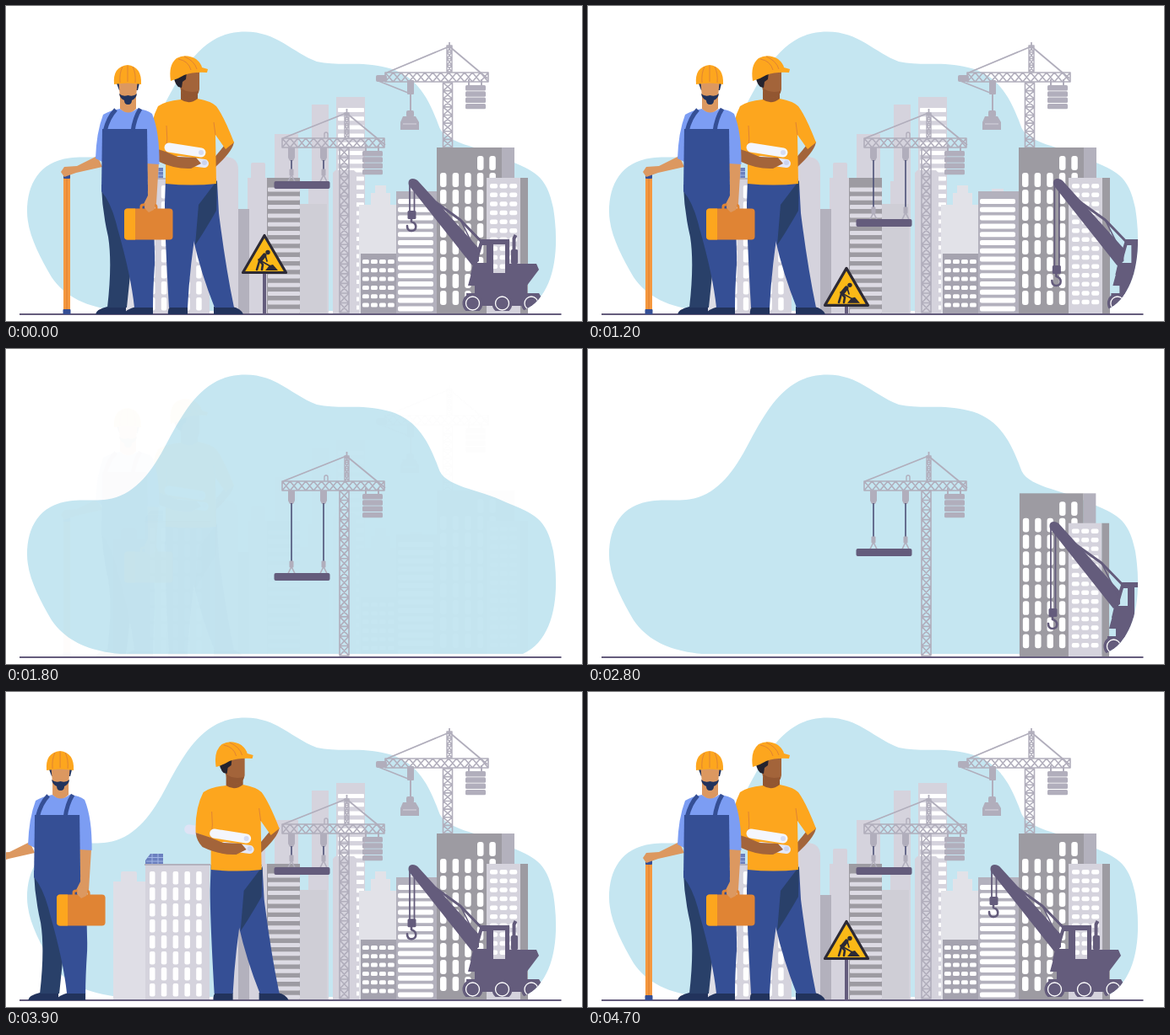
Write an HTML page that moves like this. It is 682 by 374 pixels and loops after 4.8 s.

```html
<!DOCTYPE html>
<html lang="en">
<head>
<meta charset="utf-8">
<title>Construction site</title>
<style>
html, body { margin: 0; width: 100%; height: 100%; overflow: hidden; background: #fff; }
svg { display: block; width: 682px; height: 374px; }
</style>
</head>
<body>
<svg id="stage" viewBox="0 0 682 374" xmlns="http://www.w3.org/2000/svg"></svg>
<script>
const LOOP = 4800, STEP = 100, GROUND = 365;
const C = {
  sky: '#c5e6f1', dark: '#645c7c', steel: '#b1aebc', white: '#fff',
  gray: '#9d9ba2', mid: '#b3b1bd', light: '#d5d3dd', pale: '#dfdee6',
  orange: '#fda61e', deep: '#e08434', blue: '#354f95', navy: '#294069',
  shirt: '#7c9df3', skin: '#dc9860', brown: '#a3643a', ink: '#22335c', black: '#2c2a35'
};

// drawing helpers
const rect = (x, y, w, h, fill, r = 0) =>
  `<rect x="${x}" y="${y}" width="${w}" height="${h}" rx="${r}" fill="${fill}"/>`;
const path = (d, fill) => `<path d="${d}" fill="${fill}"/>`;
const line = (d, color, w = 2, cap = 'butt') =>
  `<path d="${d}" fill="none" stroke="${color}" stroke-width="${w}" stroke-linecap="${cap}" stroke-linejoin="round"/>`;
const dot = (x, y, r, fill) => `<circle cx="${x}" cy="${y}" r="${r}" fill="${fill}"/>`;
const group = (id, body, extra = '') => `<g id="${id}" ${extra}>${body}</g>`;
const tower = (x, top, w, fill) => rect(x, top, w, GROUND - top, fill);

function windows(x, y, cols, rows, dx, dy, w, h, r = 1.5, fill = C.white) {
  let s = '';
  for (let j = 0; j < rows; j++)
    for (let i = 0; i < cols; i++) s += rect(x + i * dx, y + j * dy, w, h, fill, r);
  return s;
}

// girder with crossed bracing; cells run along its longer side
function lattice(x, y, w, h, n, rail = 1.6) {
  let d = `M${x} ${y}h${w}v${h}h${-w}z`;
  for (let i = 0; i < n; i++) {
    d += w > h
      ? `M${x + w * i / n} ${y}l${w / n} ${h}m${-w / n} 0l${w / n} ${-h}`
      : `M${x} ${y + h * i / n}l${w} ${h / n}m0 ${-h / n}l${-w} ${h / n}h${w}`;
  }
  return line(d, C.steel, rail);
}

const weights = (x, y, n) => {
  let s = line(`M${x + 4} ${y - 7}v9M${x + 19} ${y - 7}v9`, C.steel, 2);
  for (let i = 0; i < n; i++) s += rect(x, y + i * 7.3, 24, 6.4, C.steel, 1.5);
  return s;
};

const blob = 'M120 178.500C150 174 170 150 187 118C205 85 225 42 265 32.500C315 22.500 335 54 368 66' +
  'C395 72 420 65 450 73C485 81 500 108 512 141C518 164 560 166 592 182C625 196 640 200 648 240' +
  'C656 290 650 345 612 362H135C95 358 70 345 54 322C40 298 25 270 25 244C25 211 40 185 75 180.500C90 178 105 181 120 178.500Z';

const backTowers =
  tower(391, 108, 34, C.light) + windows(393, 121, 1, 24, 0, 10.2, 31, 5, 1) +
  tower(362, 117, 20, C.light) + tower(318, 152, 28, C.light) +
  tower(286, 204, 25, C.light) + rect(290, 186, 17, 20, C.light, 2) +
  tower(275, 241, 13, C.mid) +
  path('M247 365V190Q248 179 260 179Q275 180 275 194V365Z', C.light) +
  path('M165 205V200L171 192H186V205Z', '#6b80bf') +
  line('M168 196.500H186M166 201H186M173 192V205M180 192V205', '#a3b6e6', 1) +
  tower(165, 205, 76, C.light) + rect(164, 204, 78, 2, C.mid) +
  windows(170, 213, 5, 8, 13.8, 19, 6.5, 15.5, 2);

const nearTowers =
  tower(127, 225, 38, C.pale) + rect(136, 213, 19, 14, C.pale, 2) +
  tower(478, 217, 14, C.pale) +
  path('M418 365V236H432V222H437V213H450V222H455V236H462V365Z', '#e2e2e8') +
  path('M387 365V198L390 195H412L415 198V365Z', C.light) +
  rect(358, 208, 20, 30, C.light) + tower(346, 235, 34, '#cfced6') +
  tower(309, 204, 39, C.gray) + windows(310, 215.500, 1, 15, 0, 10.3, 38, 5, 1, '#dddbe4');

const midTowers =
  tower(462, 220, 48, C.mid) + windows(464, 229, 1, 14, 0, 9.8, 42, 6, 2) +
  tower(420, 294, 42, '#a5a3af') + windows(422, 301, 4, 6, 10, 10.3, 7.8, 5, 1.5);

const tallTowers =
  tower(587, 168, 15, C.mid) + tower(510, 168, 77, C.gray) +
  windows(558, 178, 2, 1, 14.3, 0, 7.5, 17, 3) +
  windows(514, 198, 5, 8, 14.6, 20, 7.5, 17, 3) +
  tower(609, 204, 9, C.gray) + tower(569, 204, 40, C.light) +
  windows(573, 211, 3, 14, 11.6, 10.6, 9, 5.5, 2);

const farCrane =
  lattice(517.5, 91, 11, 77, 8) + lattice(522, 47, 6, 31, 4, 1.4) +
  line('M525 43V50M525 48L451 79M525 48L570 86', C.steel, 1.8) +
  lattice(449, 79, 122, 11, 13) + rect(438, 82, 13, 8, C.steel, 2) +
  line('M441 89L476 103', C.steel, 1.5) + rect(475, 88, 8, 17, C.steel, 1) +
  line('M479 104V126', C.steel, 2) + rect(474, 124, 9, 8, C.steel, 2) +
  path('M470 131H485L489 138V147H467V138Z', C.steel) + line('M470 140H486', C.light, 1) +
  weights(544, 94, 4);

const trolley = x => path(`M${x - 4} 168h8v12l-2 4h-4l-2 -4z`, C.steel);
const shackle = x => rect(x - 2.5, -19, 5, 8, C.steel, 1) +
  line(`M${x} -12L${x - 4} -4M${x} -12L${x + 4} -4`, C.steel, 1.6);
const nearCrane =
  lattice(395, 168, 11, 196, 17) + lattice(401, 127, 5, 30, 4, 1.4) +
  line('M403.500 122V130M403 127L328 157M403 127L449 165', C.steel, 1.8) +
  lattice(327, 157, 121, 11, 13) + line('M377 157v-5a2 2 0 0 1 4 0v5', C.steel, 1.4) +
  weights(422, 172, 4) + trolley(338) + trolley(376) +
  `<path id="cables" fill="none" stroke="#4d5177" stroke-width="1.6"/>` +
  group('beam', shackle(338) + shackle(376) + rect(317.5, -4.5, 66, 9, C.dark, 2));

const wheel = x => dot(x, 353, 12, C.dark) +
  `<circle cx="${x}" cy="353" r="8" fill="none" stroke="#fff" stroke-width="1.3"/>`;
const truck =
  `<path id="ropes" fill="none" stroke="${C.dark}" stroke-width="1.8"/>` +
  group('hook', rect(475.500, -19, 10, 10, C.dark, 1.5) +
    line('M480 -9v3c7 2 7 11 0 11q-5 0 -5 -6', C.dark, 2.6, 'round')) +
  path('M477 213Q475 206 481 205Q486 205 489 209L560 288L560 303L552 308Z', C.dark) +
  line('M499 226L538 254L564 281', C.dark, 3) + line('M538 254L559 296', C.dark, 1.6) +
  `<path fill-rule="evenodd" fill="${C.dark}" d="M562 277H596V319H591V283H577V319H550L553 306ZM564 284H569V305H558Z"/>` +
  path('M547 332L551 317H592L596 306H628L631 313L616 333Z', C.dark) +
  line('M601.500 306V276l2 -4', C.dark, 4) + rect(598, 289, 8, 17, C.dark, 1.5) +
  rect(555, 332, 62, 11, C.dark) + path('M545 341H631L634 346L628 356H546Z', C.dark) +
  wheel(552.500) + wheel(587.500) + wheel(622);

const sign =
  rect(304, 317, 4, 50, C.dark) +
  `<path d="M306 272.500L331.500 316.500H280.500Z" fill="#fbb917" stroke="${C.black}" stroke-width="3.2" stroke-linejoin="round"/>` +
  dot(310, 292.500, 2.7, C.black) +
  line('M306 296L301 302', C.black, 5, 'round') +
  line('M301 303L304 307L303 313M300 303L297 313', C.black, 2.6, 'round') +
  line('M307 296L309 303M299 301L313 309', C.black, 1.7, 'round') +
  path('M307 314L312 308L316 307L322 314Z', C.black);

const builder =
  // rolled plans, partly behind the arm
  line('M163 163L230 173', '#dfe3f5', 11, 'round') +
  path('M194 365V357H215V366H192Q191 361 194 357ZM246 357H268Q278 359 281 366H246Z', C.ink) +
  path('M228 209H250L252 246Q260 310 270 358H247Q231 318 222 278Z', C.blue) +
  path('M189 205H249L243 228L229 240Q218 300 215 358H193Q188 270 188 235Z', C.blue) +
  path('M228 236L250 207L249 243Q236 266 224 284Z', C.navy) +
  path('M270 161Q269 172 247 192L245 182L259 165Z', C.brown) +
  path('M207 100H227V114Q217 122 207 114Z', '#925631') +
  path('M180 119Q188 113 207 111Q217 118 227 110Q243 113 249 119Q258 131 270 162L260 170L248 153L249 211Q220 214 189 211V174L171 167Q170 138 180 119Z', C.orange) +
  line('M189 174Q192 158 190 142M248 153L246 138', C.deep, 1) +
  path('M206 74H229V99Q228 108 218 109Q207 106 206 96Z', C.brown) +
  path('M207 97Q214 104 228 101Q227 108 218 109Q208 107 207 97Z', '#925631') +
  path('M199 86L214 78L213 87L209 90L208 97L204 96Q200 92 199 86Z', '#25232e') +
  path('M195 89Q192 70 202 62Q213 56 225 63Q231 68 232 73L239 75L238 79Q222 78 211 82Q203 87 195 89Z', C.orange) +
  line('M204 63Q216 65 219 76M211 60Q223 65 226 75', C.deep, 1) +
  line('M193 168L231 174', '#f4f6fd', 11, 'round') +
  line('M205 183L235 187', '#e4e8f8', 10, 'round') +
  dot(235, 186, 3, '#cbd3ee') + dot(231, 174, 3, '#d6dcf3') +
  path('M171 167L189 173L203 179L225 180L231 187L219 193Q200 194 179 184Q172 177 171 167Z', C.brown);

const foreman =
  rect(68, 202, 8, 160, '#f5983f') + line('M72 204V361', '#dd7e31', 1) +
  rect(68, 199, 8, 6, C.blue, 1) + rect(67.500, 360, 9, 6, C.blue, 1) +
  path('M120 357H142V366H106Q107 360 120 357ZM154 357H174V366H139Q142 360 154 357Z', C.ink) +
  path('M113 215H150L149 300L143 358H120Q126 306 121 274Q114 244 113 215Z', C.navy) +
  path('M113 212H168Q177 260 176 307Q174 338 174 358H152Q148 320 132 264Q125 234 113 220Z', C.blue) +
  path('M108 178L84 190L69 191L65 197L69 203L83 198L114 191Z', C.skin) +
  path('M167 185H181L178 234L175 243L165 240L163 235L168 225Z', C.skin) +
  path('M115 129Q123 124 135 122Q145 130 155 122Q167 123 173 128Q182 150 181.500 188L167 187V205H114V185L106 181Q107 150 115 129Z', C.shirt) +
  path('M114 146H167L168 220H113Z', C.blue) +
  line('M130 123Q121 132 117 149M159 122Q152 133 150 149', C.blue, 5) +
  path('M135 106H154V122Q145 131 135 122Z', C.skin) +
  path('M131 92H158L156 100H134Z', C.ink) +
  path('M133.500 91H155.500L154 109Q145 119 135 109Z', C.skin) +
  path('M134 104Q138 108 144.500 106Q151 108 155 104Q154 110 149 112Q149 117 144.500 117Q140 117 140 112Q135 110 134 104Z', C.ink) +
  path('M128 93Q126 72 144 70Q161 72 160 93Q144 90 128 93Z', C.orange) +
  line('M138 72Q134 80 135 91M150 72Q154 80 153 91M144 71V90', C.deep, 1) +
  line('M160 242V238Q160 236 163 236H175Q178 236 178 239V242', C.deep, 3) +
  rect(140, 240.500, 57.500, 37, C.deep, 4) + path('M144 240.500H153V277.500H144Q140 277.500 140 273V245Q140 240.500 144 240.500Z', C.orange) +
  path('M165 232L177 233L175 242L169 245L164 240Z', C.skin);

document.getElementById('stage').innerHTML =
  `<defs><clipPath id="sky"><path d="${blob}"/></clipPath>` +
  `<clipPath id="soil"><rect width="682" height="${GROUND + 1}"/></clipPath></defs>` +
  path(blob, C.sky) +
  group('scenery',
    group('back', backTowers) + group('far', farCrane) + group('near', nearTowers) +
    group('mid', midTowers) + group('tall', tallTowers)) +
  nearCrane +
  group('machine', group('truck', truck), 'clip-path="url(#sky)"') +
  line('M16 366H657.500', C.dark, 2) +
  group('people', group('post', group('sign', sign), 'clip-path="url(#soil)"') +
    group('builder', builder) + group('foreman', foreman));

// motion
const $ = id => document.getElementById(id);
const sine = p => (1 - Math.cos(Math.PI * p)) / 2;
const quad = p => 1 - (1 - p) ** 2;
const cubic = p => 1 - (1 - p) ** 3;
const ramp = (t, from, to, ease = sine) =>
  ease(Math.min(1, Math.max(0, (t - from) / (to - from))));
const move = (id, x, y = 0) => $(id).setAttribute('transform', `translate(${x} ${y})`);

const growers = [
  ['tall', 564, 2200, 2890], ['mid', 465, 2850, 3250], ['near', 309, 3205, 3800],
  ['back', 309, 3300, 3860], ['far', 523, 3350, 3860]
];

function draw(t) {
  const leaving = t < 1850;
  const fade = leaving ? 1 - ramp(t, 1250, 1850) : 1;
  for (const id of ['scenery', 'machine', 'people']) $(id).setAttribute('opacity', fade);

  for (const [id, x, from, to] of growers) {
    const s = leaving ? 1 : ramp(t, from, to, quad);
    $(id).setAttribute('transform', `translate(${x} ${GROUND}) scale(${s}) translate(${-x} ${-GROUND})`);
    $(id).setAttribute('visibility', s ? 'visible' : 'hidden');
  }

  const beam = 212.500 + 58 * (t < 1800 ? ramp(t, 0, 1750) : 1 - ramp(t, 1800, 3800));
  move('beam', 0, beam);
  $('cables').setAttribute('d', `M338 183V${beam - 18}M376 183V${beam - 18}`);

  const hook = 262 + 65 * (leaving ? ramp(t, 100, 1000) : 1 - ramp(t, 3300, 4370));
  move('hook', 0, hook);
  $('ropes').setAttribute('d', `M478 212V${hook - 18}M483.500 212V${hook - 18}`);

  move('truck', 180 * (leaving ? ramp(t, 800, 1700) : 1 - ramp(t, 2200, 3250)));
  move('sign', 0, 100 * (leaving ? ramp(t, 900, 1600) : 1 - ramp(t, 3950, 4550)));
  move('builder', leaving ? 0 : 530 * (1 - ramp(t, 3350, 4380, cubic)));
  move('foreman', leaving ? 0 : -225 * (1 - ramp(t, 3500, 4490, quad)));
}

const start = performance.now();
function tick() {
  const t = (performance.now() - start) % LOOP;
  draw(Math.floor(t / STEP) * STEP);
  requestAnimationFrame(tick);
}
tick();
</script>
</body>
</html>
```
